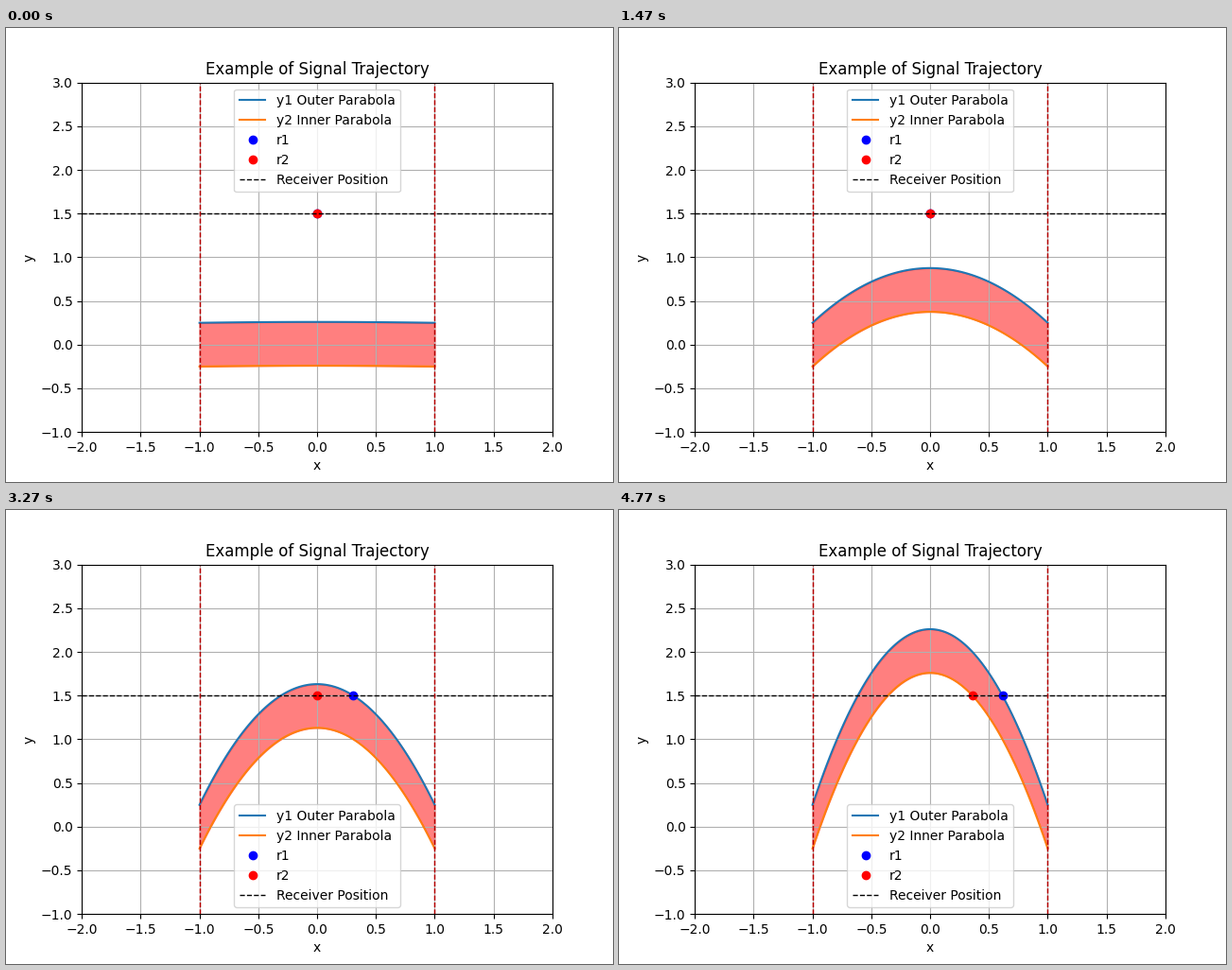
These frames come from a looping animation (642x480 px, 4.8 s). A matplotlib script:

```python
import numpy as np
import matplotlib.pyplot as plt
from matplotlib.animation import FuncAnimation

FRAMES = 160
INTERVAL = 30
EDGE = 0.25        # height of the outer curve at x = -1 and x = 1
RECEIVER = 1.5

x = np.linspace(-1, 1, 100)
bends = np.linspace(0.01, 2.01, FRAMES)

fig, ax = plt.subplots(figsize=(6.42, 4.8), dpi=100)
ax.set(xlim=(-2, 2), ylim=(-1, 3), xlabel="x", ylabel="y",
       title="Example of Signal Trajectory")
ax.grid(True)

outer, = ax.plot([], [], label="y1 Outer Parabola")
inner, = ax.plot([], [], label="y2 Inner Parabola")
r1, = ax.plot([], [], "bo", label="r1")
r2, = ax.plot([], [], "ro", label="r2")
ax.axhline(RECEIVER, color="black", ls="--", lw=1, label="Receiver Position")
for side in (-1, 1):
    ax.axvline(side, color="red", ls="--", lw=1)
    ax.axvline(side, color="black", ls="--", lw=1, alpha=0.3)
band = ax.fill_between(x, -EDGE, EDGE, color="red", alpha=0.5)
ax.legend(loc="best")


def arch(bend, edge):
    return edge + bend * (1 - x**2)


def crossing(bend, edge):
    """Right-hand x where the arch meets the receiver line, or 0 below it."""
    return np.sqrt(max(0, 1 - (RECEIVER - edge) / bend))


def update(frame):
    bend = bends[frame]
    top, bottom = arch(bend, EDGE), arch(bend, -EDGE)
    outer.set_data(x, top)
    inner.set_data(x, bottom)
    outline = np.column_stack([np.r_[x, x[::-1]], np.r_[top, bottom[::-1]]])
    band.set_verts([outline])
    r1.set_data([crossing(bend, EDGE)], [RECEIVER])
    r2.set_data([crossing(bend, -EDGE)], [RECEIVER])
    return outer, inner, band, r1, r2


anim = FuncAnimation(fig, update, frames=FRAMES, interval=INTERVAL,
                     repeat=True, repeat_delay=0)
plt.show()
```
